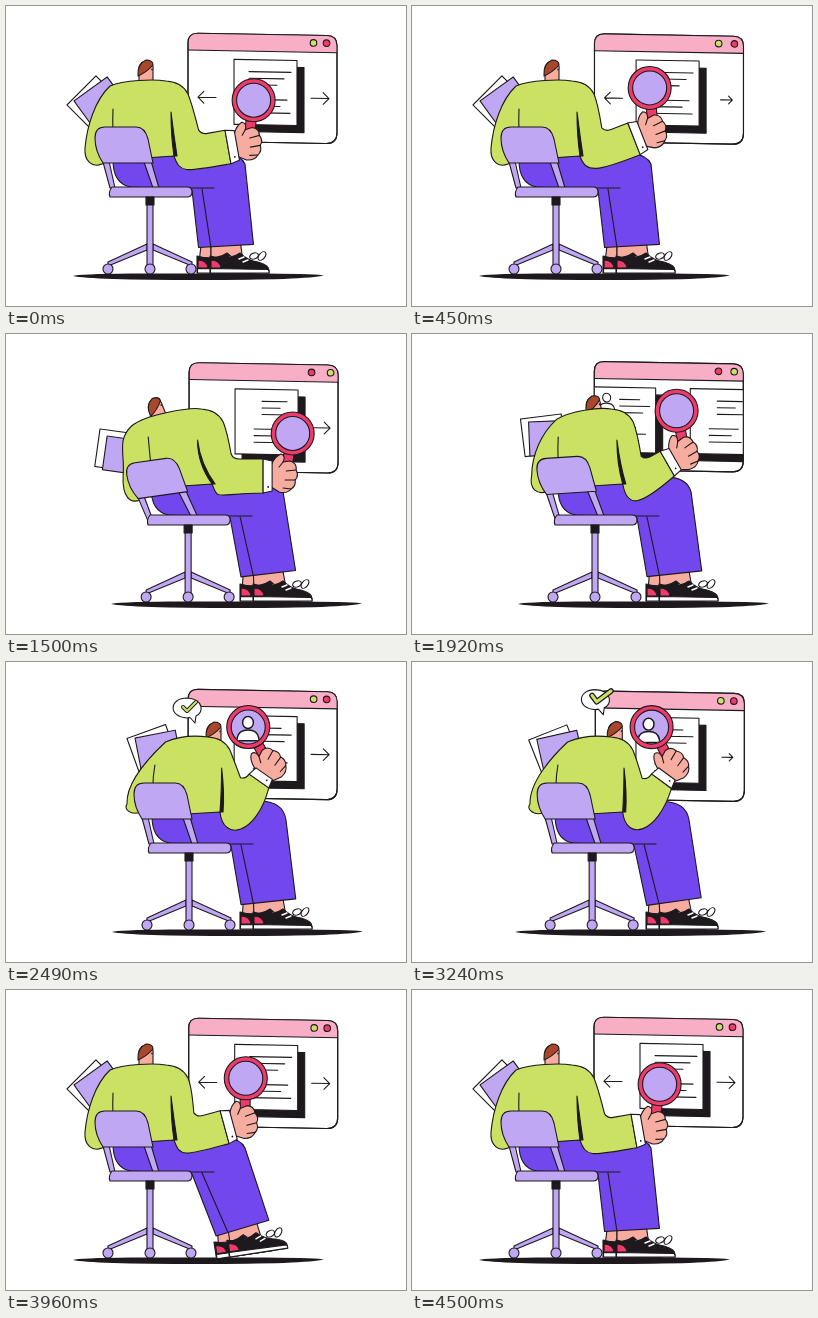
Recreate the animation shown at these times as an HTML page with a canvas. Size 400 by 300 pixels, loop 4530 ms.

```html
<!DOCTYPE html>
<html lang="en">
<head>
<meta charset="utf-8">
<title>Searching at the desk</title>
<style>
html, body { margin: 0; width: 100%; height: 100%; overflow: hidden; background: #fff; }
canvas { display: block; }
</style>
</head>
<body>
<canvas id="stage" width="400" height="300"></canvas>
<script>
const ctx = document.getElementById('stage').getContext('2d');
const LOOP = 4530, SLIDE_STARTS = [380, 1600, 3150];
const INK = '#1d191d', WHITE = '#fff', LILAC = '#c0a7f3', VIOLET = '#7347ee', GREEN = '#cae163',
  SKIN = '#f6ad9f', PINK = '#f8afc6', RED = '#ee3b69', HAIR = '#a8472c';

const rad = deg => deg * Math.PI / 180;

// Smooth step from 0 at time a to 1 at time b
function ease(t, a, b) {
  const p = Math.min(1, Math.max(0, (t - a) / (b - a)));
  return p * p * (3 - 2 * p);
}

// Rises from a to b, holds, falls from c to d
const pulse = (t, a, b, c, d) => ease(t, a, b) - ease(t, c, d);
const bump = (t, a, b, c) => pulse(t, a, b, b, c);

function draw(d, fill, stroke = INK, width = 1.1) {
  const path = new Path2D(d);
  if (fill) { ctx.fillStyle = fill; ctx.fill(path); }
  if (stroke) { ctx.strokeStyle = stroke; ctx.lineWidth = width; ctx.stroke(path); }
}

function oval(x, y, rx, ry, fill, stroke = INK) {
  draw(`M${x - rx},${y}a${rx},${ry} 0 1 0 ${2 * rx},0a${rx},${ry} 0 1 0 ${-2 * rx},0Z`, fill, stroke);
}

function group(x, y, deg, scale, content) {
  ctx.save();
  ctx.translate(x, y);
  ctx.rotate(rad(deg));
  ctx.scale(scale, scale);
  content();
  ctx.restore();
}

// Every moving part is a blend of a few gestures
function poseAt(t) {
  const rise = bump(t, 0, 960, 1500);
  const settle = bump(t, 3150, 3540, 4300);
  const back = bump(t, 960, 1500, 2300);
  const lean = pulse(t, 1500, 2300, 3150, 3740);
  const lift = rise + settle / 2;
  return {
    back, lean,
    bob: 1 - Math.cos(4 * Math.PI * t / LOOP),
    chair: 39 * pulse(t, 900, 1560, 3150, 3700),
    foot: 43 * pulse(t, 480, 900, 3620, 4260),
    footTurn: -12 * (bump(t, 480, 690, 900) + pulse(t, 3380, 3540, 3800, 4260)),
    head: { x: 140 + 29 * (lean - back), y: 62 + 10 * back + 6 * lean, turn: -22 * back },
    arm: {
      x: 222 - 3 * back - 8 * lean - 8 * settle,
      y: 141 - 18 * lift + back - 22 * lean,
      angle: -10 - 25 * lift + 10 * back - 45 * lean,
      fold: 24 + 6 * back - 18 * lean,
      half: 17 - 5 * lean,
      lens: 7 - 26 * lift + 3 * back - 36 * lean
    },
    papers: { x: 68 - 5 * back + 22 * lean, y: 95 + 7 * back - 19 * lean, turn: -36 + 44 * back + 25 * lean },
    dotGap: (6.5 + 3 * (rise + back)) * (1 - 2 * pulse(t, 960, 1450, 1950, 2420)),
    docs: visibleDocs(t)
  };
}

function visibleDocs(t) {
  const index = SLIDE_STARTS.filter(s => s <= t).length;
  if (!index) return [{ kind: 0, x: 0 }];
  const age = t - SLIDE_STARTS[index - 1];
  const out = 130 * ease(age, 100, 590) - 5.5 * ease(age, 0, 100);
  return [
    { kind: index - 1, x: out },
    { kind: index % 3, x: Math.min(0, (out - 78) * 1.7) }
  ].filter(doc => Math.abs(doc.x) < 120);
}

function personIcon(x, y, scale, fill) {
  group(x, y, 0, scale, () => {
    draw('M-8,10V8Q-7,2 0,2Q7,2 8,8V10Z', fill);
    oval(0, -3.5, 4, 4.4, fill);
  });
}

function arrow(x, y, size) {
  const s = Math.abs(size);
  draw(`M${x - size},${y}h${2 * size}l${-size * .65},${-s * .65}m${size * .65},${s * .65}l${-size * .65},${s * .65}`, null);
}

function drawDoc({ kind, x }) {
  group(228 + x, 52.5, 0, 1, () => {
    draw('M7,7H70V72H7Z', INK);
    draw('M0,0H63V65H0Z', WHITE);
    for (let row = 0; row < 6; row++) {
      const lower = row > 2;
      const left = kind === 0 ? 15 : lower ? 19 : 27;
      const right = 57 - (row * 7 + kind * 5) % 17;
      draw(`M${left},${12 + row * 6.6 + (lower ? 8 : 0)}H${right}`, null);
    }
    if (kind === 2) personIcon(14, 14, 1, WHITE);
  });
}

function drawWindow(t, { bob, docs, dotGap }) {
  const frame = 'M182,136V37Q182,27 192,27H321Q331,27 331,37V124Q331,135 320,135H184Q182,135 182,133Z';
  ctx.save();
  ctx.transform(1, .018, 0, 1, bob * .7, bob - 182 * .018);
  draw(frame, WHITE);
  ctx.save();
  ctx.clip(new Path2D(frame));
  draw('M182,20H332V44H182Z', PINK);
  const press = Math.max(...SLIDE_STARTS.map(s => bump(t - s, 0, 90, 300)));
  arrow(201, 91, -9);
  arrow(314, 90 + press, 9 - 3.5 * press);
  docs.forEach(drawDoc);
  ctx.restore();
  draw(frame, null);
  oval(314 - dotGap, 34.7, 3.3, 3.3, GREEN);
  oval(314 + dotGap, 34.7, 3.3, 3.3, RED);
  ctx.restore();
}

function drawBubble(t, x, y) {
  const size = pulse(t, 2150, 2380, 3560, 3780);
  if (size < .02) return;
  const pop = bump(t, 3120, 3240, 3400);
  group(x + 7 * pop, y - 8 * pop, 0, size, () => {
    draw('M3,9.5L8,15L9,8C17,5 17,-9 0,-10C-18,-10 -19,9 0,10Z', WHITE);
    if (t > 3330) for (const dx of [-3, 0, 3]) oval(dx, 1, .6, .6, INK, null);
    group(2 + 3 * pop, -1 - 2 * pop, 8 * pop, pulse(t, 2300, 2440, 3240, 3400) * (1 + .4 * pop), () => {
      draw('M-6,0L-2,4L7,-5', null, INK, 4);
      draw('M-6,0L-2,4L7,-5', null, GREEN, 2.2);
    });
  });
}

function drawPapers({ papers, back }) {
  group(papers.x, papers.y, papers.turn, 1, () => {
    group(-8, -1 - 5 * back, 9 * back - 9, 1, () => draw('M0,0H41V38H0Z', WHITE));
    draw('M0,0H41V34H0Z', LILAC);
  });
}

function drawHead({ x, y, turn }) {
  group(x, y, turn, 1, () => {
    draw('M-7,16V0Q-6,-7 2,-7Q8,-5 7,2V16Z', SKIN);
    draw('M-8,8Q-9,-4 0,-8Q7,-8 7,-3Q1,4 -8,8Z', HAIR);
    oval(6, 1.5, .7, .9, INK, null);
  });
}

function drawShoe() {
  draw('M0,-17Q18,-12 30,-20Q38,-12 48,-11Q59,-8 59,-3V0H0Z', INK);
  draw('M.5,-4.5L58,-3.5Q59.5,-2 59,0H.5Z', WHITE);
  draw('M1,-13Q10,-13 11,-5H1Z', RED);
  draw('M29,-14l5,-2M33,-11l5,-2', null, WHITE, 1.4);
}

function drawLegs({ chair, foot, footTurn, lean }) {
  const knee = chair + 216;
  const ax = 220 + foot - .15 * (foot - chair);
  const ay = 240 - .0045 * (ax - knee) ** 2;
  const len = Math.hypot(ax - knee, ay - 170);
  const px = 27.5 * (ay - 170) / len, py = -27.5 * (ax - knee) / len;
  const bone = foot + 205;

  draw(`M${ax - 25},${ay}L${bone - 12},256H${bone}V${ay}Z`, SKIN);
  draw(`M${ax - 15},${ay - 3}L${bone},256H${bone + 31}V248L${ax + 14},${ay - 6}Z`, SKIN);
  group(foot + 204, 267, footTurn, 1, () => {
    group(-13, 0, 0, 1, drawShoe);
    drawShoe();
    group(44, -17, -20, 1, () => oval(0, 0, 4.5, 3, null));
    group(52, -17, -50, 1, () => oval(0, 0, 5, 3, null));
  });

  const c = x => x + chair;
  draw(`M${c(107)},154L${c(165)},150
    C${c(198)},${150 - 12 * lean} ${c(230 + 7 * lean)},${140 - 10 * lean} ${c(239 + 2 * lean)},158
    L${ax + px},${ay + py}L${ax - px},${ay - py}L${c(186)},184L${c(125)},181
    C${c(112)},179 ${c(107)},168 ${c(107)},154Z`, VIOLET);
  draw(`M${c(180)},182H${c(208)}M${c(196)},183L${ax - px * .55},${ay - py * .55}`, null);
}

function drawTorso({ head, arm, back, lean }) {
  const cos = Math.cos(rad(arm.angle)), sin = Math.sin(rad(arm.angle));
  const along = (x, y) => `${arm.x + x * cos - y * sin},${arm.y + x * sin + y * cos}`;
  const { half, fold } = arm;
  const tilt = head.x - 140;
  const left = 104 + tilt * .57, top = 80 + 12 * back;
  const right = 176 + tilt * .1;
  const drop = 8 * (back - lean);
  const pit = 168 + 7 * lean;
  const crease = 165 + tilt * .4;

  draw(`M96,${158 + drop}C86,${162 + drop} 78,${155 + drop} ${79 + 3 * lean},142
    C81,120 ${left - 15},${top + 14} ${left},${top}
    C${left + 14},${74 + 6 * back} 148,73 ${right - 16},75Q${right},76 ${right + 6},88
    Q${right + 10},98 ${along(-fold - 2, -half - 5)}Q${along(-fold, -half)} ${along(6 - fold, -half)}
    L${along(0, -half)}L${along(0, half)}
    C${along(-46, half + 17 * lean)} ${174 + 4 * lean},${168 + 12 * lean} ${pit},150
    L109,154Z`, GREEN);
  draw(`M${107 + tilt * .1},103Q106,125 109,152`, null);
  draw(`M${crease},106Q${crease},130 ${pit},150h3Q${crease + 3},130 ${crease},106Z`, INK);
}

function drawHandAndLens({ chair, arm, docs, bob }) {
  const a = rad(arm.angle), l = rad(arm.lens);
  const gx = chair + arm.x + 24 * Math.cos(a) + 11 * Math.sin(a);
  const gy = arm.y + 24 * Math.sin(a) - 11 * Math.cos(a);
  const cx = gx + 32 * Math.sin(l), cy = gy - 32 * Math.cos(l);

  group(gx, gy, arm.lens, 1, () => draw('M-5,-13H5V6H-5Z', RED));
  oval(cx, cy, 21.5, 21.5, RED);
  oval(cx, cy, 17, 17, LILAC);
  ctx.save();
  ctx.beginPath();
  ctx.arc(cx, cy, 16.5, 0, 7);
  ctx.clip();
  for (const doc of docs) {
    if (doc.kind === 2) personIcon(242 + doc.x, 65 + bob, 1.35, WHITE);
  }
  ctx.restore();

  group(chair + arm.x, arm.y, arm.angle, 1, () => {
    const h = arm.half;
    draw('M8,-11Q12,-20 18,-22Q23,-20 20,-14L27,-15Q34,-13 33,-6Q36,0 32,4Q33,10 28,13Q24,18 16,16L8,11Z', SKIN);
    draw('M23,-5L33,-6M22,4L32,4M20,12L28,13M20,-14L16,-9', null);
    draw(`M0,${-h}L9,${2 - h}V${h - 2}L0,${h}Z`, WHITE);
    oval(5, h - 6, .9, .9, INK, null);
  });
}

function drawChair({ back }) {
  group(150, 182, -8 * back, 1, () => {
    draw('M-53,-26L-47,-27L-41,0H-46ZM-12,-26L-5,-27L3,0H-3Z', LILAC);
    draw('M-53,-25Q-61,-37 -61,-50Q-61,-61 -51,-61H-20Q-11,-61 -8,-49L-3,-25Z', LILAC);
  });
  draw('M106,181H181Q186,181 186,186Q186,191 181,191H104Q102,186 106,181Z', LILAC);
  draw('M140,191H148V199H140Z', INK);
  draw('M141,238L102,256V260L141,244ZM147,238L186,256V260L147,244Z', LILAC);
  draw('M141,199H147V259H141Z', LILAC);
  for (const x of [102, 144, 185]) oval(x, 263, 5, 5, LILAC);
}

function render(t) {
  const pose = poseAt(t);
  const onChair = content => group(pose.chair, 0, 0, 1, content);

  ctx.fillStyle = WHITE;
  ctx.fillRect(0, 0, 400, 300);
  onChair(() => draw('M67,270Q72,268 125,267.5H260Q314,268 318,269.5Q300,274 193,274Q85,274 67,270Z', INK, null));
  drawWindow(t, pose);
  drawBubble(t, pose.chair + pose.head.x - 27, pose.head.y - 22);
  onChair(() => {
    drawPapers(pose);
    drawHead(pose.head);
  });
  drawLegs(pose);
  onChair(() => drawTorso(pose));
  drawHandAndLens(pose);
  onChair(() => drawChair(pose));
}

ctx.lineJoin = ctx.lineCap = 'round';
function tick() {
  render(performance.now() % LOOP);
  requestAnimationFrame(tick);
}
tick();
</script>
</body>
</html>
```
